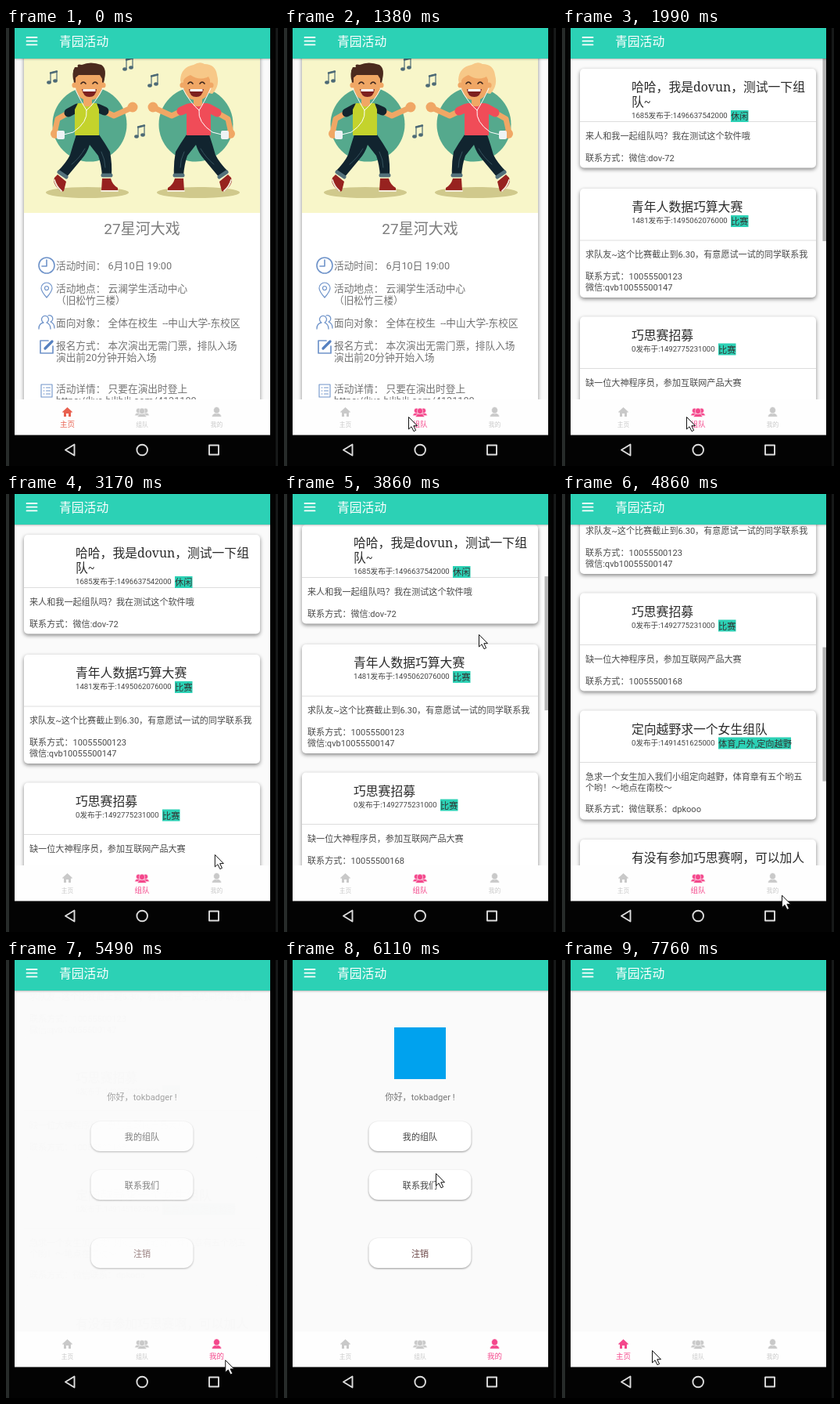
An HTML page for the animation above (7990 ms loop, 348 by 559 pixels).

```html
<!DOCTYPE html>
<html lang="zh-CN">
<head>
<meta charset="utf-8">
<style>
html, body { margin: 0; width: 100%; height: 100%; overflow: hidden; background: #000; }
svg { display: block; width: 348px; height: 559px; }
text { font-family: Roboto, "Noto Sans CJK SC", sans-serif; white-space: pre; }
.title { font-family: "Noto Serif", "Noto Sans CJK SC", serif; }
.card { filter: drop-shadow(0 2.2px 2.8px #0007); }
.line { fill: none; stroke-linecap: round; stroke-linejoin: round; }
</style>
</head>
<body>
<svg id="stage" viewBox="0 0 348 559"></svg>
<script>
const LOOP = 7990;
const $ = id => document.getElementById(id);
const text = (x, y, size, fill, s, extra = '') =>
  `<text x="${x}" y="${y}" font-size="${size}" fill="${fill}" ${extra}>${s}</text>`;
const mid = (x, y, size, fill, s) => text(x, y, size, fill, s, 'text-anchor="middle"');
const rect = (x, y, w, h, fill, extra = '') =>
  `<rect x="${x}" y="${y}" width="${w}" height="${h}" fill="${fill}" ${extra}/>`;
const line = (d, color, w) => `<path class="line" d="${d}" stroke="${color}" stroke-width="${w}"/>`;
const shape = (d, fill) => `<path d="${d}" fill="${fill}"/>`;

// ---- home page ----
const note = (x, y) => `<g transform="translate(${x} ${y})">` +
  line('M-2 6V-6L6 -8V4', '#4d6a76', 1.2) + line('M-2 -5.5L6 -7.5', '#4d6a76', 2.4) +
  '<g fill="#4d6a76"><ellipse cx="-4" cy="6.5" rx="2.8" ry="2.2"/><ellipse cx="4" cy="4.5" rx="2.8" ry="2.2"/></g></g>';

function dancer(hair, shirt, sleeve, backHair, fringe) {
  const skin = '#f0a765', dark = '#11242f', cuff = '#53717b';
  return '<circle cx="107" cy="123" r="47.5" fill="#55a98d"/>' +
    '<ellipse cx="104" cy="210" rx="53" ry="7" fill="#d0c98c"/>' +
    shape('M62 191L66 187L77 196L74 208Q70 210 67 205Q59 198 62 191Z', '#97221f') +
    shape('M123 192H134Q136 200 143 204V208H122Z', '#97221f') +
    line('M62 194Q64 202 71 208M122 208H143', '#f4eedc', 1.8) +
    shape('M90 136H119Q126 146 133 158Q136 174 135 189H123Q122 174 118 163L107 149Q104 159 97 167L77 191L66 183Q77 172 82 162Q86 148 90 136Z', dark) +
    line('M68 184L77 190M124 188H134', cuff, 5) +
    line('M101 154Q94 166 84 174M122 158Q127 168 127 178', '#35525d', 1) +
    line('M89 103L66 116L62 134', skin, 7) + line('M119 103L138 112L158 103', skin, 7) +
    `<circle cx="162" cy="101" r="6.5" fill="${skin}"/><circle cx="63" cy="135" r="6" fill="${skin}"/>` +
    line('M91 102L80 108M117 102L126 106', sleeve, 11) +
    shape('M92 96H116L119 104V137H88V104Z', shirt) +
    rect(99, 86, 11, 14, skin, 'rx="4"') +
    shape(backHair, hair) +
    shape('M89 60H123V74Q122 92 106 92Q90 92 89 74Z', skin) +
    `<circle cx="88" cy="73" r="3.6" fill="${skin}"/><circle cx="124" cy="73" r="3.6" fill="${skin}"/>` +
    shape(fringe, hair) +
    line('M96 71Q99 67 102 71M111 71Q114 67 117 71', '#3a241c', 1.6) +
    shape('M97 78H116Q115 88 106.5 88Q99 88 97 78Z', '#7d2020') + rect(98.5, 78, 16, 3, '#fff') +
    line('M88 77Q97 96 103 105Q105 120 86 133L74 136M124 77Q114 96 103 105', '#fff', 1) +
    rect(65, 131, 10, 11, '#eef3f5', 'rx="2"');
}

const rows = [
  [307.5, '活动时间： 6月10日 19:00'], [336.5, '活动地点： 云澜学生活动中心'], [351.5, '（旧松竹三楼）'],
  [380.5, '面向对象： 全体在校生  --中山大学-东校区'], [409.5, '报名方式： 本次演出无需门票，排队入场'],
  [424.5, '演出前20分钟开始入场'], [464.5, '活动详情： 只要在演出时登上'],
  [479.5, 'https://live.bilibili.com/4131180']
];
const rowIcons = line('M62 303A10 10 0 1 1 42 303A10 10 0 1 1 62 303M52 296V304H46', '#7094ca', 1.6) +
  line('M52 344Q45 336 45 332A7 7 0 0 1 59 332Q59 336 52 344ZM54.5 332A2.5 2.5 0 1 1 49.5 332A2.5 2.5 0 1 1 54.5 332', '#7094ca', 1.2) +
  line('M42 384Q42 377 48 376A4.5 4.5 0 1 1 52 376Q57 378 57 384M54 367A4 4 0 1 1 57 375Q62 377 62 383', '#7094ca', 1.3) +
  line('M54 399H44V415H60V406', '#7094ca', 1.7) + line('M50 409L59 400', '#5580c0', 3.3) +
  line('M45 455H59V471H45ZM48 459H49M51.5 459H56.5M48 463H49M51.5 463H56.5M48 467H49M51.5 467H56.5', '#7094ca', 1.1);

const home = rect(23, 30, 302, 460, '#fff', 'class="card"') + rect(23, 39, 302, 197, '#f8f6c9') +
  dancer('#4b2a1e', '#c4d32c', '#14252e', 'M87 70Q84 56 88 50H124Q128 58 125 70Z',
    'M86 66Q84 50 92 50Q90 45 97 47Q108 42 122 47Q130 52 125 68L120 60H93Z') +
  '<g transform="matrix(-1 0 0 1 350 0)">' +
  dancer('#f7c888', '#f04c58', '#f04c58', 'M86 84Q76 74 80 60Q82 46 96 46Q102 42 110 47Q126 50 127 66L125 76Z',
    'M87 70V56Q104 44 124 56L125 70Q121 62 114 60Q102 68 91 62Z') + '</g>' +
  note(59, 63) + note(156, 46) + note(188, 67) + note(171, 132) +
  mid(174, 262.5, 19, '#7c7c7c', '27星河大戏') + rowIcons +
  rows.map(([y, s]) => text(64, y, 12.7, '#737373', s)).join('');

// ---- team page ----
const posts = [
  { y: 52, title: ['哈哈，我是dovun，测试一下组', '队~'], stamp: '1685发布于:1496637542000', tagX: 216, tag: '休闲', tagW: 22.5,
    body: ['来人和我一起组队吗？我在测试这个软件哦', '', '联系方式：微信:dov-72'] },
  { y: 205, title: ['青年人数据巧算大赛'], stamp: '1481发布于:1495062076000', tagX: 216, tag: '比赛', tagW: 22.5,
    body: ['求队友~这个比赛截止到6.30，有意愿试一试的同学联系我', '', '联系方式：10055500123', '微信:qvb10055500147'] },
  { y: 368.5, title: ['巧思赛招募'], stamp: '0发布于:1492775231000', tagX: 200, tag: '比赛', tagW: 22.5,
    body: ['缺一位大神程序员，参加互联网产品大赛', '', '联系方式：10055500168'] },
  { y: 518.5, title: ['定向越野求一个女生组队'], stamp: '0发布于:1491451625000', tagX: 200, tag: '体育,户外,定向越野', tagW: 93,
    body: ['急求一个女生加入我们小组定向越野，体育章有五个哟五', '个哟！～地点在南校～', '', '联系方式：微信联系：dpkooo'] },
  { y: 683, title: ['有没有参加巧思赛啊，可以加人'], stamp: '', tagX: 200, tag: '', tagW: 0, body: ['', '', ''] }
];

function post({ y, title, stamp, tagX, tag, tagW, body }) {
  const two = title.length - 1, rule = two ? 67 : 65.5, first = rule + 22.7;
  const s = 44 + two * 19;
  return `<g transform="translate(0 ${y})">` +
    rect(23, 0, 302, first + (body.length - 1) * 13.9 + 9, '#fff', 'rx="5" class="card"') +
    rect(23, rule, 302, 1, '#ddd') +
    title.map((t, i) => text(89, 29 + i * 19, 15.8, '#2a2a2a', t, 'class="title"')).join('') +
    text(89, s, 9.6, '#444', stamp) + rect(tagX, s - 10, tagW, 15, '#2cd1b5') +
    text(tagX, s + 2, 11.2, '#333', tag) +
    body.map((t, i) => text(30, first + i * 13.9, 11.1, '#4a4a4a', t)).join('') + '</g>';
}

// ---- profile page ----
const button = (y, s, fill) => rect(108.5, y, 131, 38, '#fff', 'rx="12" style="filter:drop-shadow(0 1px 1.2px #0006)"') +
  mid(174, y + 23.5, 11.1, fill, s);
const mine = rect(141, 86, 66, 66, '#00a2ee', 'id="avatar"') + mid(174, 178.5, 11.2, '#777', '你好，tokbadger !') +
  button(206, '我的组队', '#444') + button(268, '联系我们', '#444') + button(355, '注销', '#6a4545');

// ---- bottom tabs ----
const person = (x, y, k) => `<g transform="translate(${x} ${y}) scale(${k})" stroke="#fefefe" stroke-width=".7">` +
  '<path d="M-6.3 6.3Q-6 2.4 -2 1.5H2Q6 2.4 6.3 6.3Z"/><ellipse cy="-2.2" rx="4" ry="4.3"/></g>';
const tabs = [
  [78.5, '主页', '<path d="M-6.5 0L0 -6L6.5 0L5.5 1L4.5 0.3V6H1.5V2H-1.5V6H-4.5V0.3L-5.5 1Z"/>'],
  [174, '组队', person(-4.5, 0, .75) + person(4.5, 0, .75) + person(0, .8, .9)],
  [269.5, '我的', person(0, 0, 1)]
];

$('stage').innerHTML =
  '<defs><clipPath id="view"><rect x="11" y="39" width="327" height="435"/></clipPath></defs>' +
  rect(0, 0, 348, 559, '#030303') + rect(0, 0, 4, 559, '#272b2a') + rect(345, 0, 3, 559, '#161818') +
  rect(11, 39, 327, 435, '#fafafa') +
  `<g clip-path="url(#view)"><g id="home">${home}</g>` +
  `<g id="team"><g id="list">${posts.map(post).join('')}</g></g>` +
  `<g id="mine">${mine}</g>${rect(333.5, 39, 4.5, 171, '#b4b4b4', 'id="bar"')}</g>` +
  rect(11, 39, 327, 1, '#0003') + rect(11, 40, 327, 1.5, '#0001') +
  rect(11, 0, 327, 39, '#2cd1b5') + line('M26.5 12H39.5M26.5 16.7H39.5M26.5 21.4H39.5', '#fff', 1.8) +
  text(68, 22.5, 15.8, '#fff', '青园活动') +
  rect(11, 474, 327, 45.5, '#fefefe') +
  tabs.map(([x, s, icon], i) => `<g id="tab${i}"><g transform="translate(${x} 490)">${icon}</g>` +
    `<text x="${x}" y="508.5" text-anchor="middle">${s}</text></g>`).join('') +
  line('M87.5 531.5V545.5L76 538.5ZM181 538.5A6.8 6.8 0 1 1 167.4 538.5A6.8 6.8 0 1 1 181 538.5M260 532.5H272V544.5H260Z', '#ddd', 1.9) +
  '<path id="cursor" d="M.5 .5V16L4 12.8L7 18.7L9.6 17.5L6.8 11.7H11.5Z" fill="#fff" stroke="#111"/>';

// ---- timing: the screen refreshes in bursts [start, end, steps] ----
const bursts = [
  [380, 1000, 9], [1380, 1380, 1], [1530, 1690, 3], [1990, 1990, 1], [2240, 2850, 9], [3020, 3020, 1],
  [3170, 3940, 11], [4090, 4630, 8], [4770, 5020, 5], [5270, 5560, 5], [5730, 6280, 8], [6430, 6900, 7],
  [7530, 7530, 1], [7680, 7760, 2]
];
function snap(t) {
  let at = 0;
  for (const [a, b, n] of bursts) {
    const d = (b - a) / (n - 1) || 1;
    if (t >= a) at = Math.min(b, a + d * Math.floor((t - a) / d + .2));
  }
  return at;
}

const path = [
  [380, 96, 535], [770, 175, 507], [1000, 159, 496], [2160, 159, 496], [2500, 215, 483], [2850, 269, 499],
  [3020, 270, 499], [3400, 262, 400], [3863, 249, 179], [3940, 254, 115], [4090, 262, 210], [4244, 281, 432],
  [4630, 284, 516], [4770, 281, 511], [4860, 281, 512], [4950, 285, 519], [5020, 281, 511], [5650, 280, 510],
  [6123, 194, 272], [6280, 184, 256], [6430, 165, 236], [6740, 61, 465], [6900, 75, 499], [7600, 75, 499], [7760, 115, 498]
];
const scroll = [[3786, 0], [3863, 13], [3940, 70], [4090, 190], [4244, 236], [4630, 242]];
const homeFade = [[1450, 1], [1690, 0]];
const teamFade = [[5270, 1], [5488, 0]];
const mineFade = [[5343, 0], [5560, 1], [7600, 1], [7760, 0]];

function at(keys, t) {
  const i = keys.findIndex(k => k[0] > t);
  if (i < 0) return keys[keys.length - 1].slice(1);
  if (!i) return keys[0].slice(1);
  const a = keys[i - 1], b = keys[i], p = (t - a[0]) / (b[0] - a[0]);
  return a.slice(1).map((v, j) => v + (b[j + 1] - v) * p);
}

const set = (id, attrs) => { for (const k in attrs) $(id).setAttribute(k, attrs[k]); };

function draw(t) {
  const y = at(scroll, t)[0], fresh = t < 3020;
  set('home', { opacity: at(homeFade, t) });
  set('team', { opacity: t < 1990 ? 0 : at(teamFade, t) });
  set('list', { transform: `translate(0 ${-y})` });
  set('mine', { opacity: at(mineFade, t) });
  set('avatar', { opacity: t < 5730 ? 0 : 1 });
  const barOn = t >= 1990 && fresh || t >= 3786 && t < 5020;
  set('bar', { opacity: barOn ? 1 : 0, y: fresh ? 39 : 100 + y * .395, height: fresh ? 233 : 171 });
  const active = t < 1380 ? 0 : t < 5270 ? 1 : t < 7530 ? 2 : 0;
  tabs.forEach((_, i) => {
    const color = i !== active ? '#c9c9c9' : t < 1380 ? '#e8604f' : '#f4488c';
    set('tab' + i, { fill: color, 'font-size': i === active ? 9.5 : 7.8 });
  });
  const [cx, cy] = at(path, t);
  set('cursor', { transform: `translate(${cx} ${cy})`, opacity: t < 380 ? 0 : 1 });
}

const start = performance.now();
function tick() {
  draw(snap((performance.now() - start) % LOOP));
  requestAnimationFrame(tick);
}
tick();
</script>
</body>
</html>
```
